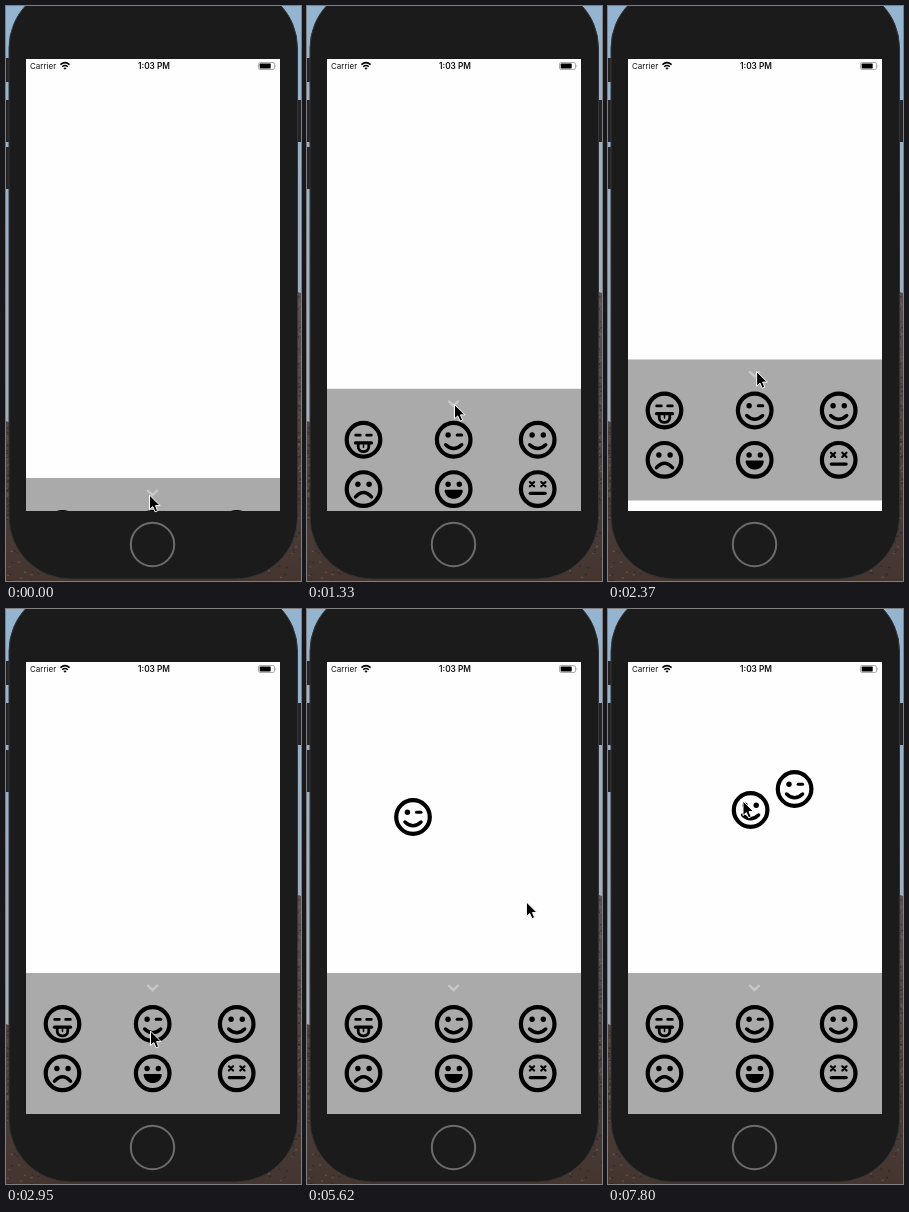
An HTML page that plays this animation: 295 px wide and 575 px high, repeating every 8 s.

```html
<!DOCTYPE html>
<html lang="en">
<head>
<meta charset="utf-8">
<title>Sticker tray</title>
<style>
  html, body { margin: 0; width: 100%; height: 100%; overflow: hidden; }
  svg { display: block; width: 295px; height: 575px; }
  text { font-family: Inter, "Liberation Sans", sans-serif; fill: #111; }
  .line { fill: none; stroke: #000; stroke-linecap: round; }
</style>
</head>
<body>
<svg viewBox="0 0 295 575">
  <defs>
    <linearGradient id="sky" x2="0" y2="1">
      <stop offset="0" stop-color="#94b4d0"/>
      <stop offset=".35" stop-color="#9bb0c4"/>
      <stop offset=".7" stop-color="#a5adb8"/>
    </linearGradient>
    <linearGradient id="rock" x2="0" y2="1">
      <stop offset="0" stop-color="#5c5256"/>
      <stop offset="1" stop-color="#44352f"/>
    </linearGradient>
    <clipPath id="screen"><path d="M20 53H274V505H20Z"/></clipPath>

    <circle id="ring" r="16.8" class="line" stroke-width="4.2"/>
    <g id="eyes"><circle cx="-5.6" cy="-4.8" r="2.7"/><circle cx="5.6" cy="-4.8" r="2.7"/></g>
    <path id="smile" class="line" stroke-width="3.5" d="M-8 5Q0 12.5 8 5"/>

    <g id="wink">
      <use href="#ring"/><use href="#smile"/>
      <circle cx="-5.6" cy="-4.8" r="2.7"/>
      <path class="line" stroke-width="3" d="M3.5-4.8H8"/>
    </g>
    <g id="happy"><use href="#ring"/><use href="#eyes"/><use href="#smile"/></g>
    <g id="tongue">
      <use href="#ring"/>
      <path class="line" stroke-width="2.8" d="M-7.8-4.6H-3.2M3.2-4.6H7.8"/>
      <path class="line" stroke-width="3.2" d="M-8 3.2H8"/>
      <path class="line" stroke-width="2.8" d="M-5.3 4V7C-5.3 13.5 5.3 13.5 5.3 7V4"/>
      <path class="line" stroke-width="1.5" d="M0 5V7.5"/>
    </g>
    <g id="sad">
      <use href="#ring"/><use href="#eyes"/>
      <path class="line" stroke-width="3.5" d="M-8 7.8Q0-1 8 7.8"/>
    </g>
    <g id="grin">
      <use href="#ring"/><use href="#eyes"/>
      <path d="M-8.4 .8H8.4Q9.2 .8 9 2.2C7.5 12.3-7.5 12.3-9 2.2Q-9.2 .8-8.4 .8Z"/>
    </g>
    <g id="dead">
      <use href="#ring"/>
      <path class="line" stroke-width="2.2" d="M-7.8-7L-3.6-2.8M-3.6-7L-7.8-2.8M3.6-7L7.8-2.8M7.8-7L3.6-2.8"/>
      <path class="line" stroke-width="3.3" d="M-7.4 4.3H7.4"/>
    </g>
  </defs>

  <rect width="295" height="575" fill="url(#sky)"/>
  <path fill="url(#rock)" d="M0 415L12 420L280 282L295 287V575H0Z"/>
  <g id="specks"></g>

  <path fill="#242426" d="M0 52H4V76H0ZM0 94H4V136H0ZM0 141H4V183H0ZM290 94H295V136H290Z"/>
  <rect x="3" y="-20" width="288.5" height="593" rx="62" fill="#1b1b1b" stroke="#343436"/>
  <circle cx="146.5" cy="538.5" r="21.7" fill="none" stroke="#6c6c6c" stroke-width="2"/>
  <path fill="#fefefe" d="M20 53H274V505H20Z"/>

  <text x="24" y="63" font-size="8">Carrier</text>
  <text x="148" y="63" font-size="8.3" font-weight="600" text-anchor="middle">1:03 PM</text>
  <g fill="none" stroke="#000" stroke-width="1.5">
    <path d="M54.4 58.6Q59 54.6 63.6 58.6M56.2 60.7Q59 58.2 61.8 60.7"/>
    <path fill="#000" stroke="none" d="M57.4 62.1Q59 60.8 60.6 62.1L59 63.8Z"/>
  </g>
  <rect x="252.5" y="56.5" width="16" height="7" rx="1.6" fill="none" stroke="#999" stroke-width=".8"/>
  <rect x="253.7" y="57.6" width="11" height="4.8" rx=".6"/>
  <path fill="#888" d="M269.6 58.6Q271 60 269.6 61.4Z"/>

  <g clip-path="url(#screen)">
    <g id="tray">
      <path fill="#aaa" d="M20 0H274V141H20Z"/>
      <path fill="none" stroke="#c9c9c9" stroke-width="2.4" d="M141.3 12L146.5 17L151.7 12"/>
      <use href="#tongue" x="56.5" y="51"/><use href="#wink" x="146.7" y="51"/><use href="#happy" x="230.7" y="51"/>
      <use href="#sad" x="56.5" y="100.3"/><use href="#grin" x="146.7" y="100.3"/><use href="#dead" x="230.7" y="100.3"/>
    </g>
    <use id="winkCopy" href="#wink"/>
    <use id="happyCopy" href="#happy"/>
  </g>
  <path id="cursor" stroke="#fff" d="M0 0V14.6L3.3 11.6L5.6 16.8L8.2 15.7L6 10.6H10.6Z"/>
</svg>
<script>
const LOOP = 8000, STEP = 147.3, LAST = 53;
const el = id => document.getElementById(id);
const smooth = p => p * p * (3 - 2 * p);
const out = p => 1 - (1 - p) ** 1.8;

// A path is a start point and legs: first step, last step, x, y, easing.
function glide(k, [x, y], ...legs) {
  for (const [from, to, tx, ty, ease = smooth] of legs) {
    const p = ease(Math.max(0, Math.min(1, (k - from) / (to - from))));
    x += (tx - x) * p;
    y += (ty - y) * p;
  }
  return [x, y];
}

// Pull the tray up, push it down, then fling it up so that it settles back.
const tray = k => glide(k, [0, 472],
  [0, 5, 0, 364], [8, 12, 0, 484], [12, 13, 0, 472], [14, 17, 0, 312], [17, 18, 0, 364]);

const cursor = k => glide(k, [143.5, 489],
  [0, 5, 143.5, 377], [5, 8, 147, 380], [8, 12, 150, 497], [12, 13, 150.5, 484],
  [14, 17, 148, 324], [17, 20, 144.5, 422],
  [21, 26, 140, 264], [29, 30, 131, 261], [30, 32, 92, 206],
  [35, 39, 243, 309], [39, 43, 126, 204], [43, 46, 207, 176, out],
  [46, 51, 225, 409], [51, 53, 135, 192]);

const wink = k => glide(k, [146.7, 415],
  [21, 26, 150, 265], [29, 30, 145, 262.8], [30, 32, 106, 208], [43, 46, 186.6, 180, out]);

const happy = k => glide(k, [230.7, 415], [51, 53, 142.6, 201]);

function place(id, path, k, shownFrom = 0) {
  el(id).setAttribute("transform", `translate(${path(k)})`);
  el(id).style.display = k < shownFrom ? "none" : "";
}

function addSpecks() {
  let seed = 7, html = "";
  const rnd = () => (seed = seed * 16807 % 2147483647) / 2147483647;
  for (let i = 0; i < 240; i++) {
    const right = i % 2, top = right ? 290 : 420;
    const y = top + rnd() * (575 - top);
    const x = rnd() * (y > 515 ? 45 : 4);
    const tone = rnd() < .5 ? "#2a2120" : "#7a685f";
    html += `<rect x="${right ? 294 - x : x}" y="${y}" width="2" height="1.3" fill="${tone}" opacity=".6"/>`;
  }
  el("specks").innerHTML = html;
}

function draw(time) {
  const k = Math.min(LAST, Math.floor((time % LOOP + 10) / STEP));
  place("tray", tray, k);
  place("winkCopy", wink, k, 22);
  place("happyCopy", happy, k, 52);
  place("cursor", cursor, k);
}

addSpecks();
const start = performance.now();
function tick() {
  draw(performance.now() - start);
  requestAnimationFrame(tick);
}
tick();
</script>
</body>
</html>
```
